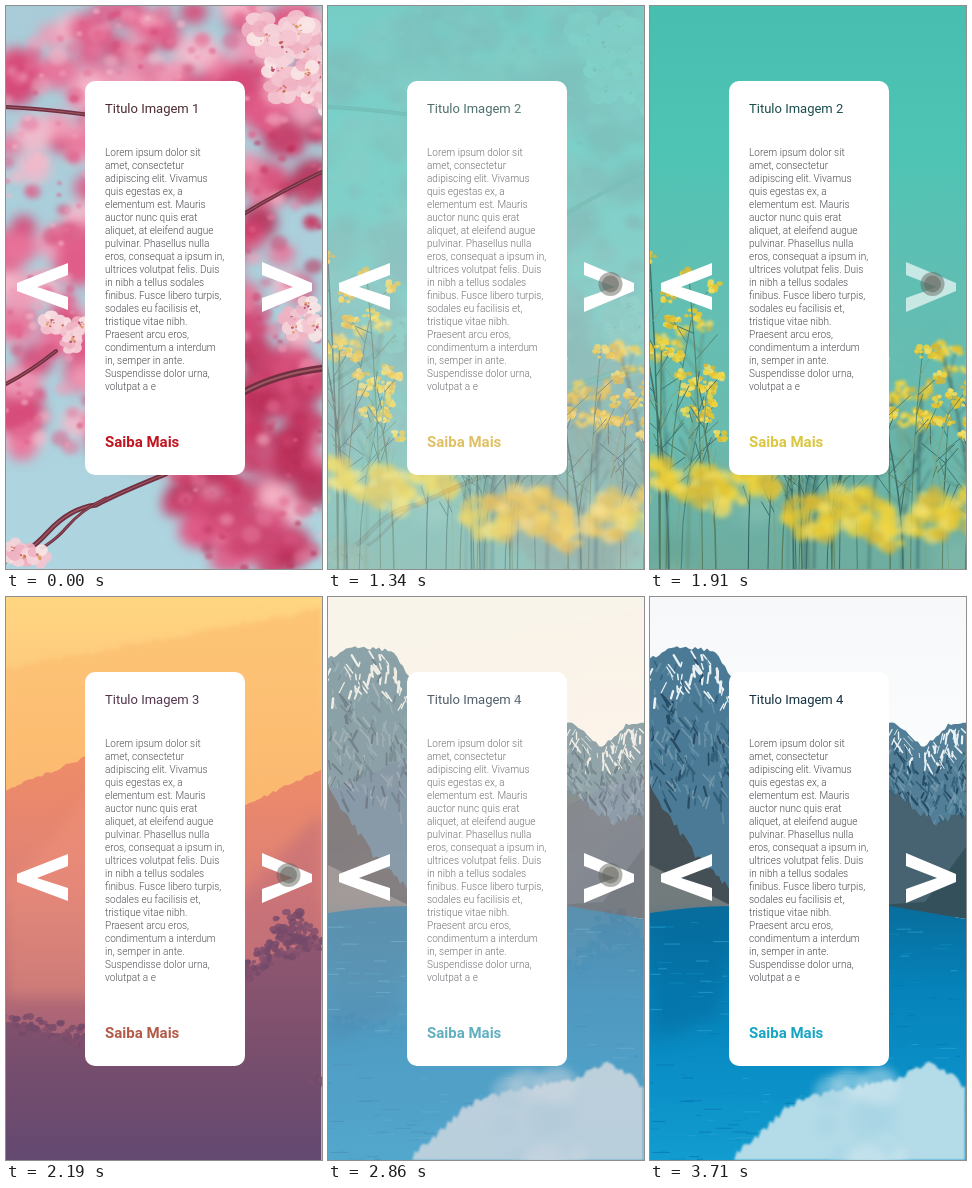
Animation of 316 by 563 pixels, one loop 4110 ms. Source, as an HTML page:

```html
<!DOCTYPE html>
<html lang="pt">
<head>
<meta charset="utf-8">
<title>Carrossel</title>
<style>
  html, body { margin: 0; width: 100%; height: 100%; overflow: hidden; background: #fff; }
  svg { position: absolute; left: 0; top: 0; width: 100%; height: 100%; display: block; }
  .slide { will-change: opacity; }
  text { font-family: Roboto, sans-serif; }
  .title { font-size: 13px; }
  .body { font-size: 10px; font-weight: 300; }
  .more { font-size: 15px; font-weight: 700; }
</style>
</head>
<body>
<script>
const W = 316, H = 563;
const LOOP = 4110, PRESS = 130, FADE = 300;
const CLICKS = [0, 1, 2].map(i => 1010 + 765 * i);
const BODY = `Lorem ipsum dolor sit
amet, consectetur
adipiscing elit. Vivamus
quis egestas ex, a
elementum est. Mauris
auctor nunc quis erat
aliquet, at eleifend augue
pulvinar. Phasellus nulla
eros, consequat a ipsum in,
ultrices volutpat felis. Duis
in nibh a tellus sodales
finibus. Fusce libero turpis,
sodales eu facilisis et,
tristique vitae nibh.
Praesent arcu eros,
condimentum a interdum
in, semper in ante.
Suspendisse dolor urna,
volutpat a e`.split('\n');

let seed = 7;
const rnd = () => (seed = (seed * 16807) % 2147483647) / 2147483647;
const between = (a, b) => a + (b - a) * rnd();
const pick = list => list[Math.floor(rnd() * list.length)];
const times = (n, fn) => Array.from({ length: n }, (_, i) => fn(i)).join('');
const clamp = v => Math.max(0, Math.min(1, v));
const ease = v => v * v * (3 - 2 * v);
const fix = v => v.toFixed(1);

// Drawing helpers, each returns SVG markup
const soft = (blur, ...parts) => `<g style="filter:blur(${blur}px)">${parts.join('')}</g>`;
const line = (d, color, width) =>
  `<path d="${d}" fill="none" stroke="${color}" stroke-width="${fix(width)}" stroke-linecap="round"/>`;
const dot = (x, y, r, fill, o = 1) =>
  `<ellipse cx="${fix(x)}" cy="${fix(y)}" rx="${fix(r)}" ry="${fix(r * between(.7, 1))}" fill="${fill}" opacity="${o}"/>`;
const area = (d, id, ...colors) =>
  `<linearGradient id="${id}" x2="0" y2="1">${colors.map((c, i) =>
    `<stop offset="${i / (colors.length - 1)}" stop-color="${c}"/>`).join('')}</linearGradient>` +
  `<path d="${d}" fill="url(#${id})"/>`;
const STAGE = `M0 0H${W}V${H}H0Z`;

// Random dots gathered around a centre
const cluster = (n, x, y, spread, size, colors, o = .85) => times(n, () => {
  const a = between(0, 2 * Math.PI), d = spread * Math.sqrt(rnd());
  return dot(x + Math.cos(a) * d, y + Math.sin(a) * d * .85, between(size / 2, size), pick(colors), o);
});

// Height along a few key points
const skyline = (...pts) => x => {
  const i = Math.max(1, pts.findIndex(p => p[0] >= x));
  const [[x0, y0], [x1, y1]] = [pts[i - 1], pts[i]];
  return y0 + (y1 - y0) * (x - x0) / (x1 - x0);
};
function ridge(height, from, to, rough, floor = H) {
  let d = `M${from} ${floor}`;
  for (let x = from; x <= to; x += 3) d += `L${x} ${fix(height(x) + between(-rough, rough))}`;
  return d + `V${floor}Z`;
}

function blossoms() {
  const pink = ['#e8749b', '#f09bb6', '#e05d89', '#f5b9ca', '#d64a78'];
  const deep = ['#c83663', '#d9557f', '#b92e58', '#e57a9c', '#cc4570'];
  const pale = ['#f6d3da', '#f9e6e6', '#f0b2c3', '#f4c4cf'];
  const isSky = (x, y) => x * .55 + y < 52 || y > 442 && x < 120 + (y - 442) * .75;
  const layer = (n, size, o) => times(n, () => {
    const x = between(0, W), y = between(0, H);
    if (isSky(x, y)) return '';
    const shade = x > 165 && y > 120 && rnd() < .75 ? deep : pink;
    return dot(x, y, between(size / 2, size), pick(shade), o);
  });
  const flower = (x, y, r) => {
    const turn = rnd();
    return times(5, i => {
      const a = turn + i * Math.PI * .4;
      return dot(x + Math.cos(a) * r * .6, y + Math.sin(a) * r * .6, r * .55, pick(pale), .9);
    }) + cluster(6, x, y, r * .4, 1.6, ['#c4613f', '#b9435f', '#dc9a5a']);
  };
  const bunch = (n, x, y, spread, r) => times(n, () =>
    flower(x + between(-spread, spread), y + between(-spread, spread), between(r * .7, r)));
  const bark = (d, w) => line(d, '#732f42', w) + line(d, '#9d5a63', w / 4);
  return area(STAGE, 'spring', '#a9cbd8', '#aed5e0') +
    soft(6, layer(320, 24, .9)) + soft(2.5, layer(280, 10, .55)) + soft(1, layer(300, 4.5, .55)) +
    soft(.6, bark('M0 101Q40 103 84 109', 4), bark('M236 209Q275 185 318 165', 4),
      bark('M0 378Q25 365 50 345', 4), bark('M236 387Q270 368 318 362', 7)) +
    bark('M0 555Q20 550 42 526T90 499Q115 486 160 468', 5) + bark('M10 556Q45 540 60 522T100 492', 3) +
    soft(.6, bunch(22, 287, 60, 40, 17), bunch(6, 60, 325, 18, 13), bunch(5, 295, 310, 18, 13), bunch(6, 18, 556, 16, 13));
}

function rapeseed() {
  const yellow = ['#f2d83c', '#e6c72d', '#f5e262', '#d3b834'];
  const green = ['#3c6f66', '#54805c', '#2f6462', '#76a888'];
  const plant = () => {
    const x = between(-10, W + 10), top = 415 - (x < 100 ? 165 : 70) * rnd();
    const lean = between(-35, 35);
    const along = f => [x + lean * f * f, H + (top - H) * f];
    const tip = (px, py) => cluster(9, px, py, 7, 3.6, yellow);
    const [tx, ty] = along(1);
    return line(`M${fix(x)} ${H}Q${fix(x)} ${fix((H + ty) / 2)} ${fix(tx)} ${fix(ty)}`, pick(green), between(.8, 1.8)) +
      times(7, i => {
        const [bx, by] = along(.35 + i * .09);
        const ex = bx + between(-24, 24), ey = by - between(10, 32);
        return line(`M${fix(bx)} ${fix(by)}L${fix(ex)} ${fix(ey)}`, pick(green), .9) + (i > 4 ? tip(ex, ey) : '');
      }) + tip(tx, ty);
  };
  return area(STAGE, 'meadow', '#40bdb0', '#46c3b5', '#5cbfb4', '#68bcb0', '#6cae9f') +
    soft(8, cluster(26, 160, 520, 190, 26, ['#7fb08d', '#8ec5b6', '#5f9f8d'], .4)) +
    soft(1.5, times(14, plant)) + times(34, plant) +
    soft(2.5, times(9, i => cluster(24, i * 40, between(465, 535), 27, 10, yellow, .75)));
}

function sunset() {
  const leaves = ['#7d4866', '#6f4263', '#774564'];
  const haze = skyline([0, 72], [W, 12]);
  const far = skyline([0, 193], [80, 160], [150, 150], [240, 208], [W, 172]);
  const near = skyline([0, 425], [80, 440], [160, 435], [265, 355], [W, 340]);
  return area(STAGE, 'dusk', '#ffd47c', '#fbb76c', '#f6a066', '#f09a70') +
    soft(2, `<path d="${ridge(haze, 0, W, 3)}" fill="#fbb768" opacity=".55"/>`) +
    soft(.6, area(ridge(far, 0, W, 1.5), 'far', '#f0895f', '#dd7a70', '#a65d70', '#8c5068')) +
    soft(7, '<path d="M0 290L90 190 130 400H0Z" fill="#f19279" opacity=".4"/>',
      '<path d="M225 310L316 215V400H225Z" fill="#bf6874" opacity=".6"/>') +
    soft(.6, area(ridge(near, 0, W, 4), 'near', '#8d4f69', '#744766', '#5c4069'),
      times(14, i => { const x = i < 5 ? i * 18 : 150 + i * 13; return cluster(16, x, near(x), 13, 4, leaves); }),
      cluster(50, 286, 330, 20, 5, leaves));
}

function lake() {
  const rock = ['#345f79', '#5f8ea5', '#264b63', '#7396aa'];
  const left = skyline([0, 62], [25, 50], [65, 53], [92, 100], [130, 210]);
  const right = skyline([190, 175], [240, 123], [274, 150], [298, 128], [W, 127]);
  const woods = skyline([220, 180], [285, 225], [W, 218]);
  const slope = skyline([0, 190], [45, 258], [100, 312]);
  const cloud = skyline([84, 560], [140, 508], [185, 492], [240, 485], [280, 463], [W, 490]);
  const crags = (height, from, to, depth) => times(260, () => {
    const x = between(from, to), f = rnd(), y = height(x) + 2 + depth * f, s = between(4, 12);
    return line(`M${fix(x)} ${fix(y)}l${fix(s * between(-.6, 1))} ${fix(s)}`,
      f < .28 && rnd() < .8 ? '#e9f1f4' : pick(rock), between(.8, 2.6));
  });
  const ripples = times(190, () =>
    line(`M${fix(between(-10, W))} ${fix(between(325, H))}h${fix(between(3, 18))}`, pick(['#0878ac', '#2ba5d0', '#0c8cc0']), .7));
  return area(STAGE, 'snow', '#f6f8f9', '#fff', '#fff') +
    `<path d="${ridge(left, 0, 129, 2, 320)}" fill="#4a7a95"/><path d="${ridge(right, 190, W, 2, 320)}" fill="#527f97"/>` +
    soft(.6, crags(left, 0, 100, 150), crags(right, 230, W, 95)) +
    soft(.7, `<path d="${ridge(woods, 220, W, 4, 320)}" fill="#476270"/><path d="${ridge(slope, 0, 99, 4, 320)}" fill="#444f56"/>`,
      '<path d="M0 268L84 310 0 318Z" fill="#737c7d"/><path d="M230 308L275 305 316 250V322Z" fill="#34505a"/>') +
    area(`M0 316Q50 308 90 309H240L${W} 322V${H}H0Z`, 'water', '#086d9c', '#0583ba', '#0a8fc6', '#129ccf') +
    soft(9, '<path d="M0 320H85L70 420 0 445Z" fill="#05669a" opacity=".45"/>') +
    soft(.5, ripples) + soft(1.2, `<path d="${ridge(cloud, 84, W, 4)}" fill="#b4dbe8"/>`) +
    soft(4, cluster(14, 225, 530, 60, 22, ['#cfe8f0', '#a5d3e4'], .5));
}

// photo, title colour, link colour
const SLIDES = [
  [blossoms, '#4b2a30', '#c0141f'],
  [rapeseed, '#154b48', '#dcc83c'],
  [sunset, '#4a2b45', '#b0513f'],
  [lake, '#12303f', '#17a5c4'],
];
const card = (n, title, link) => `
  <rect x="79" y="75" width="160" height="394" rx="10" fill="#fff"/>
  <text class="title" x="99" y="107" fill="${title}">Titulo Imagem ${n}</text>
  <g class="body" fill="#4a4b50">${BODY.map((s, i) => `<text x="99" y="${150 + i * 13}">${s}</text>`).join('')}</g>
  <text class="more" x="99" y="441" fill="${link}">Saiba Mais</text>`;
const svg = (inner, cls = '') =>
  `<svg class="${cls}" viewBox="0 0 ${W} ${H}" preserveAspectRatio="none">${inner}</svg>`;

document.body.innerHTML =
  SLIDES.map(([photo, title, link], i) => svg(photo() + card(i + 1, title, link), 'slide')).join('') +
  svg(`<path d="M62 257L11 277V285L62 304V291L31 281 62 269Z" fill="#fff"/>
    <path id="next" d="M256 256L306 277V285L256 306V292L287 281 256 269Z" fill="#fff"/>
    <path id="trace" d="M276 474Q278 461 296 463V470Q287 471 287 484L279 485Z" fill="#8c4a62" opacity=".65"/>
    <g id="cursor"><circle id="ring" r="12"/><circle r="8.5" opacity=".55"/></g>`);

const slides = [...document.querySelectorAll('.slide')];
const [next, trace, cursor, ring] = ['next', 'trace', 'cursor', 'ring'].map(id => document.getElementById(id));
const show = (el, on) => el.setAttribute('visibility', on ? 'visible' : 'hidden');

function draw(t) {
  const fades = CLICKS.map(c => clamp((t - c - PRESS) / FADE));
  slides.forEach((el, i) => {
    const o = (i ? fades[i - 1] : 1) * (1 - (fades[i] ?? 0));
    el.style.opacity = o;
    el.style.visibility = o ? 'visible' : 'hidden';
  });

  const dim = Math.max(...CLICKS.map(c => Math.sin(Math.PI * clamp((t - c) / (2 * PRESS)))));
  next.setAttribute('opacity', 1 - .35 * dim);

  const enter = ease(clamp((t - 390) / 290)), leave = clamp((t - 3210) / 500) ** 2;
  const pressed = CLICKS.some(c => t >= c && t < c + PRESS);
  cursor.setAttribute('transform',
    `translate(${285 - 2.5 * enter + 45 * leave} ${473 - 195 * enter + 300 * leave})`);
  cursor.setAttribute('fill', pressed ? '#c0c032' : '#66665f');
  ring.setAttribute('opacity', pressed ? .8 : .5);
  show(cursor, t >= 390 && t < 3710);
  show(trace, t >= 460 && t < CLICKS[0] + PRESS);
}

const start = performance.now();
function tick() {
  draw((performance.now() - start) % LOOP);
  requestAnimationFrame(tick);
}
tick();
</script>
</body>
</html>
```
